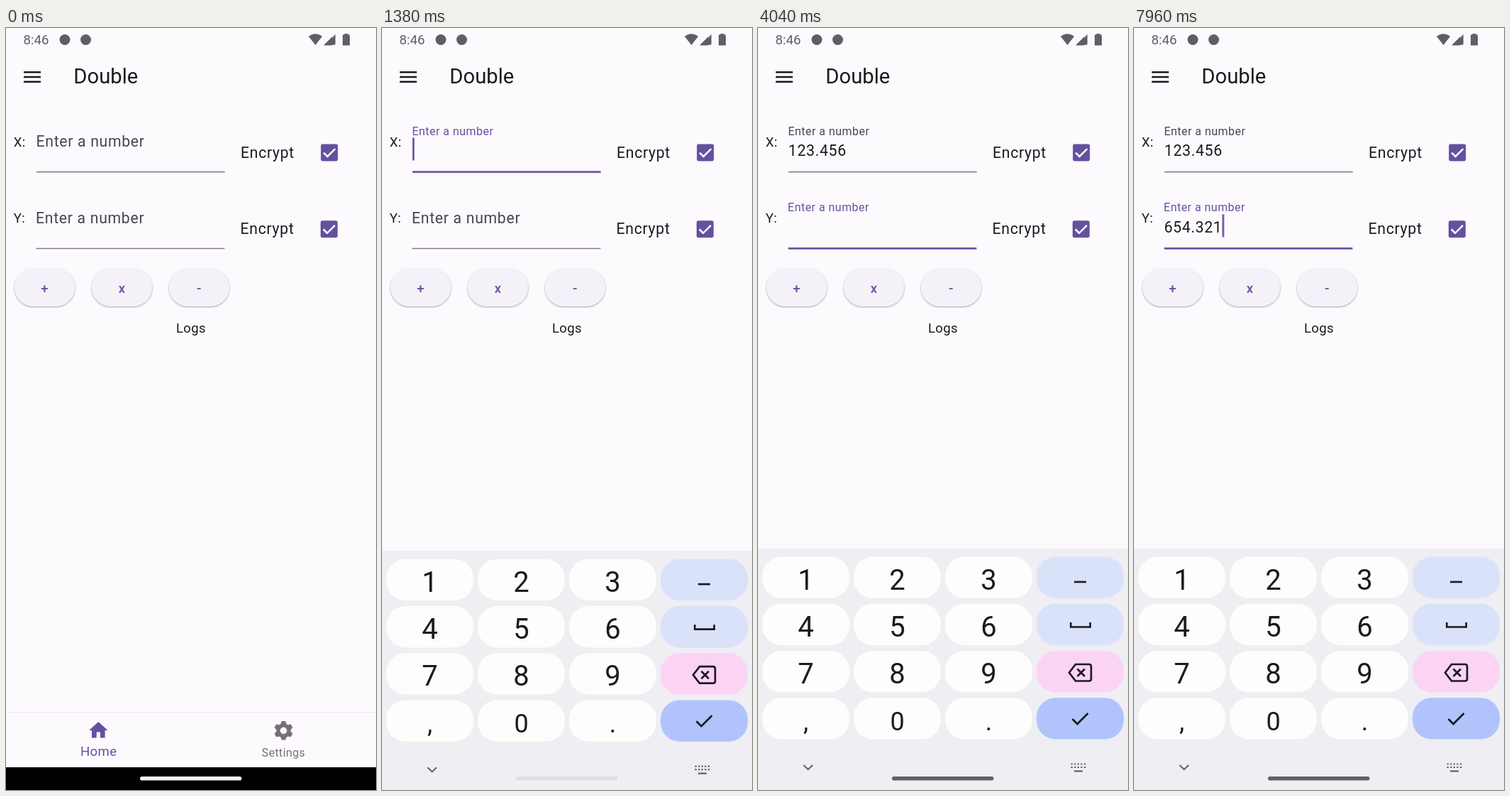
These frames come from a looping animation (522x1073 px, 8 s). An HTML page:

```html
<!DOCTYPE html>
<html lang="en">
<head>
<meta charset="utf-8">
<title>Double</title>
<style>
  html, body { margin: 0; width: 100%; height: 100%; overflow: hidden; background: #fdfafe; }
  svg { display: block; width: 522px; height: 1073px; font-family: Roboto, sans-serif; }
  text { white-space: pre; fill: #1b1a1f; }
  .large { font-size: 21.27px; letter-spacing: .66px; }
  .medium { font-size: 18.6px; letter-spacing: .33px; }
  .small { font-size: 15.95px; letter-spacing: .4px; }
  .mid { text-anchor: middle; }
  .label { fill: #49454f; }
  .accent, .button text { fill: #6550a0; }
  .button rect { fill: #f5f1f9; filter: drop-shadow(0 1.4px 1px #0005); }
  .button text { font-weight: 500; }
  .status { fill: #605e64; }
  .key { fill: #fdfdfc; }
  .digit { font-size: 40px; }
  .icon { fill: none; stroke: #1b1b1f; stroke-width: 2.7; }
</style>
</head>
<body>
<svg viewBox="0 0 522 1073">
  <defs>
    <g id="check">
      <rect x="-12" y="-12" width="24" height="24" rx="2.7" class="accent"/>
      <path d="M-8 .3L-2.7 5.6L8.2 -5.3" fill="none" stroke="#fff" stroke-width="2.5"/>
    </g>
    <path id="tooth" d="M-3.4 -6L-2 -10H2L3.4 -6Z"/>
  </defs>

  <rect width="522" height="1073" fill="#fdfafe"/>

  <g class="status">
    <text x="24.5" y="23" class="status" font-size="18.6">8:46</text>
    <circle cx="83" cy="16.5" r="7.5"/>
    <circle cx="112.500" cy="16.500" r="7.5"/>
    <path d="M427 12Q436.500 4.500 446 12L436.500 24Z"/>
    <path d="M465 8V24H449Z" opacity=".35"/>
    <path d="M460 13V24H449ZM464 10V23H451" stroke="#605e64" stroke-width="1"/>
    <path d="M477.500 9.500V8H482.500V9.500H485V24.500H475V9.500Z"/>
  </g>

  <path d="M25 62.300H49M25 69H49M25 75.700H49" stroke="#1b1a1f" stroke-width="2.6"/>
  <text x="95.300" y="78.300" font-size="29.24">Double</text>

  <g id="fields"></g>
  <g id="buttons"></g>
  <text x="261" y="429.300" class="medium mid">Logs</text>

  <rect y="963" width="522" height="1.300" fill="#f1eaf3"/>
  <path transform="translate(114.400 973) scale(1.329)" class="accent" d="M10 20v-6h4v6h5v-8h3L12 3 2 12h3v8z"/>
  <text x="130.700" y="1025" class="medium mid accent">Home</text>
  <g id="gear" transform="translate(391.500 989.300) scale(1.329)" fill="#757077">
    <circle r="5.600" fill="none" stroke="#757077" stroke-width="4"/>
  </g>
  <text x="391.500" y="1026" class="small mid" style="fill:#757077">Settings</text>
  <rect y="1041" width="522" height="32" fill="#000"/>

  <g id="keyboard">
    <rect y="733" width="522" height="345" fill="#eeeef3"/>
    <g id="keys"></g>
    <path class="icon" d="M446 780H463"/>
    <path class="icon" d="M441.300 837V843.500H468.700V837"/>
    <path class="icon" d="M448 896H467Q470 896 470 899V916.500Q470 919.500 467 919.500H448L439 907.800ZM450.500 902.500L461 913M461 902.500L450.500 913"/>
    <path class="icon" d="M443.500 973L450.500 980L465.500 965"/>
    <path class="icon" style="stroke:#5f5f63;stroke-width:2" d="M64.500 1038L70.700 1044.200L77 1038"/>
    <path class="icon" style="stroke:#5f5f63;stroke-width:2.200" stroke-dasharray="2.200 2.400" d="M441.500 1036.500H462.500M441.500 1041H462.500"/>
    <path class="icon" style="stroke:#5f5f63;stroke-width:2.200" d="M446 1046.500H458"/>
  </g>
  <rect id="handle" x="189" y="1054" width="143.500" height="5.600" rx="2.800"/>
</svg>
<script>
const LOOP = 8000, EASE = 'cubic-bezier(.4,0,.2,1)';
const ACCENT = '#6550a0', INK = '#49454f';
const $ = id => document.getElementById(id);

function add(parent, tag, attrs, text = '') {
  const el = document.createElementNS('http://www.w3.org/2000/svg', tag);
  for (const name in attrs) el.setAttribute(name, attrs[name]);
  el.textContent = text;
  return parent.appendChild(el);
}

// Stops are [ms, style, easing]; without an easing the style is held until the next stop.
function track(el, stops) {
  const frames = stops.map(([ms, style, easing = 'steps(1, end)']) =>
    ({ ...style, offset: ms / LOOP, easing }));
  frames.push({ ...stops[stops.length - 1][1], offset: 1 });
  el.animate(frames, { duration: LOOP, iterations: Infinity });
}

function addField({ name, x, dy, focus, blur, value, times }) {
  const g = add($('fields'), 'g', { transform: `translate(0 ${dy})` });
  add(g, 'text', { x: 10.8, y: 166.7, class: 'medium' }, name);
  add(g, 'text', { x: x + 288, y: 182.5, class: 'large' }, 'Encrypt');
  add(g, 'use', { href: '#check', x: x + 413.2, y: 175.4 });

  const line = add(g, 'rect', { width: 265.7, height: 1.3 });
  const thin = { transform: `translate(${x}px, 202px)`, fill: '#706b75' };
  const thick = { transform: `translate(${x}px, 201.300px) scale(1, 2.05)`, fill: ACCENT };
  track(line, [[0, thin], [focus, thin, EASE], [focus + 150, thick],
    ...(blur ? [[blur, thick, EASE], [blur + 150, thin]] : [])]);

  const label = add(g, 'text', { class: 'large' }, 'Enter a number');
  const low = { transform: `translate(${x - .5}px, 167px) scale(1)`, fill: INK };
  const high = { transform: `translate(${x - .5}px, 150.500px) scale(.75)`, fill: ACCENT };
  track(label, [[0, low], [focus, low, EASE], [focus + 167, high],
    ...(blur ? [[blur, high, EASE], [blur + 167, { ...high, fill: INK }]] : [])]);

  const text = add(g, 'text', { x: x - .2, y: 180, class: 'large' });
  [...value].forEach((char, i) => {
    const span = add(text, 'tspan', {}, char);
    track(span, [[0, { fillOpacity: 0 }], [times[i], { fillOpacity: 1 }]]);
  });

  // The caret restarts its half-second blink at every input.
  const caret = add(g, 'rect', { y: 154.5, width: 2.66, height: 32, fill: ACCENT });
  const stops = [[0, { opacity: 0, transform: `translate(${x}px)` }]];
  const inputs = [focus, ...times], end = blur || LOOP;
  let at = x;
  inputs.forEach((start, i) => {
    if (i) at += value[i - 1] === '.' ? 6.26 : 12.6;
    const until = inputs[i + 1] || end;
    for (let ms = start, on = 1; ms < until; ms += 500, on = 1 - on)
      stops.push([ms, { opacity: on, transform: `translate(${at}px)` }]);
  });
  if (blur) stops.push([blur, { opacity: 0, transform: `translate(${at}px)` }]);
  track(caret, stops);
}

addField({ name: 'X:', x: 43, dy: 0, focus: 1060, blur: 3480, value: '123.456',
  times: [1680, 1900, 2120, 2350, 2550, 2750, 3080] });
addField({ name: 'Y:', x: 42.6, dy: 107.8, focus: 3480, value: '654.321',
  times: [4650, 5000, 5350, 5900, 6250, 6600, 6900] });

['+', 'x', '-'].forEach((sign, i) => {
  const g = add($('buttons'), 'g', { class: 'button', transform: `translate(${11.7 + i * 109} 0)` });
  add(g, 'rect', { y: 338.7, width: 85.6, height: 53.2, rx: 26.6 });
  add(g, 'text', { x: 42.8, y: 372.5, class: 'medium mid' }, sign);
});

for (let a = 0; a < 360; a += 60)
  add($('gear'), 'use', { href: '#tooth', transform: `rotate(${a})` });

const sideFills = ['#d9e2f8', '#d9e2f8', '#fbd3f5', '#b0c4fb'];
['123', '456', '789', ',0.'].forEach((row, r) => {
  const y = 744.6 + r * 66.2;
  for (let c = 0; c < 4; c++) {
    const key = add($('keys'), 'rect', { x: 6 + c * 129, y, width: 123, height: 58.4, rx: 27, class: 'key' });
    if (c === 3) { key.style.fill = sideFills[r]; continue; }
    const digit = add($('keys'), 'text', { x: 67.5 + c * 129, y: y + 46, class: 'digit mid' }, row[c]);
    if (r === 3) digit.style.fontSize = '36px';
  }
});

const down = { transform: 'translate(0, 345px)' }, up = { transform: 'translate(0, 0)' };
track($('keyboard'), [[0, down], [1132, down, EASE], [1417, up]]);
const light = { fill: '#f4f0f4' }, dark = { fill: '#5f5f62' };
track($('handle'), [[0, light], [1340, light, 'linear'], [1380, { fill: '#dfdfe3' }, 'linear'], [1640, dark]]);
</script>
</body>
</html>
```
